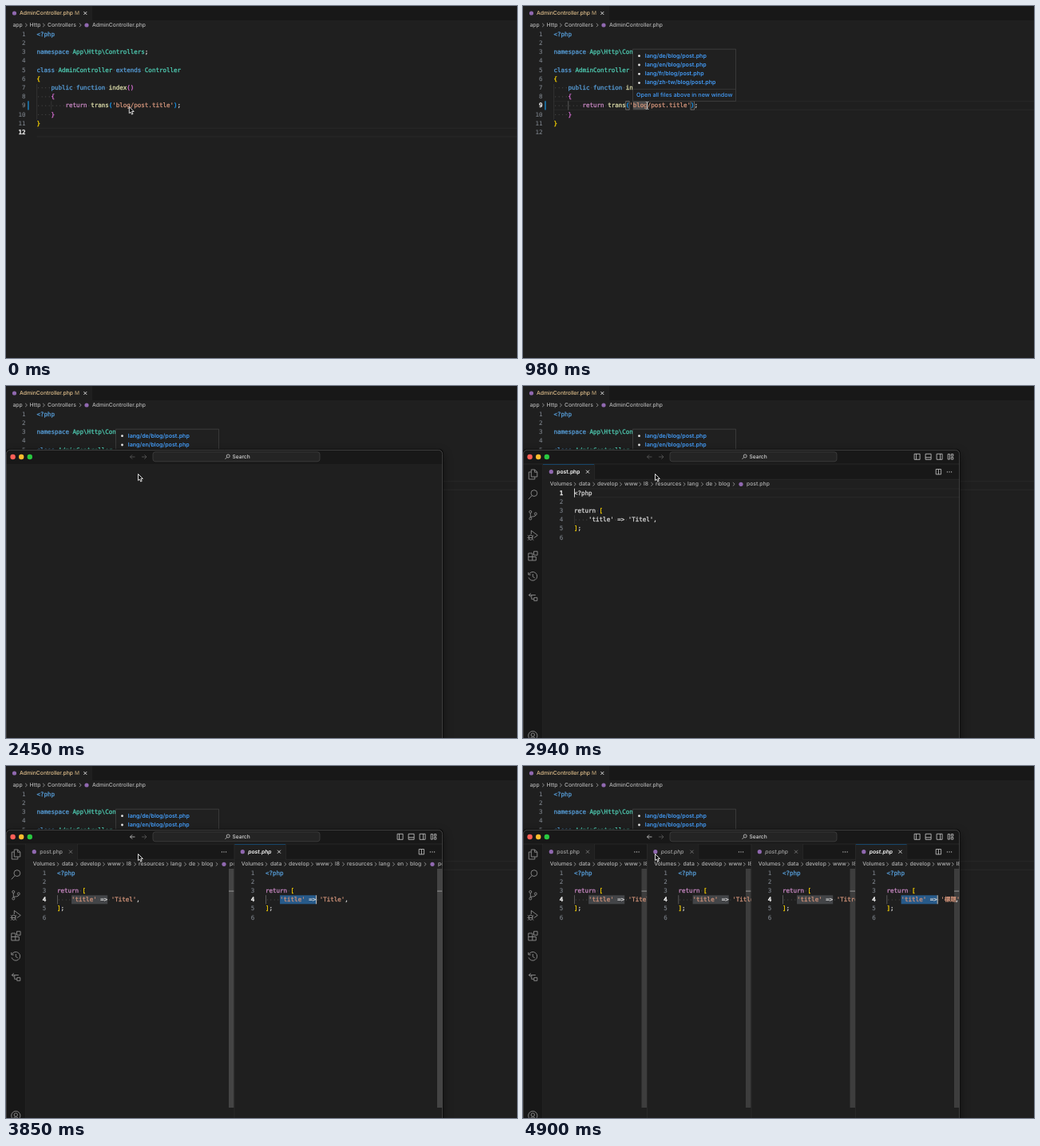
An HTML page with a canvas that plays this animation: 640x442 px, repeating every 4.97 s.

```html
<!DOCTYPE html>
<html lang="en">
<head>
<meta charset="utf-8">
<title>Open translation files</title>
<style>
html, body { margin: 0; width: 100%; height: 100%; overflow: hidden; background: #1f1f1f; }
canvas { display: block; width: 640px; height: 442px; }
</style>
</head>
<body>
<canvas id="stage"></canvas>
<script>
const W = 640, H = 442, LOOP = 4970, STEP = 70;
const CHAR = 4.515, LINE = 11.2;
const MONO = '7.5px "DejaVu Sans Mono", "Noto Sans CJK SC", "Noto Sans CJK JP", monospace';
const BG = '#1f1f1f', BAR = '#181818', EDGE = '#2b2b2b';
const COLORS = {
  b: '#569cd6', t: '#4ec9b0', g: '#ffd700', p: '#da70d6', k: '#c586c0',
  f: '#dcdcaa', s: '#ce9178', n: '#179fff', w: '#d4d4d4'
};
const T = {
  beam: 210, click: 350, popup: 770, move: 1260, moveEnd: 1540, window: 1750,
  search: 2240, bench: 2590, editor: 2730, tokens: 3010
};
const CLASS_CODE = [
  '~b<?php', '', '~bnamespace ~tApp\\Http\\Controllers~w;', '',
  '~bclass ~tAdminController ~bextends ~tController', '~g{',
  '~w    ~bpublic function ~findex~p()', '~w    ~p{',
  "~w        ~kreturn ~ftrans~n(~s'blog/post.title'~n)~w;",
  '~w    ~p}', '~g}', ''
];
const PANES = [
  { lang: 'de', word: 'Titel', open: T.editor, select: 3150 },
  { lang: 'en', word: 'Title', open: 3430, select: 3640 },
  { lang: 'fr', word: 'Titre', open: 3920, select: 4060 },
  { lang: 'zh-tw', word: '標題', open: 4200, select: 4410 }
];

const canvas = document.getElementById('stage');
const c = canvas.getContext('2d');
const ratio = window.devicePixelRatio || 1;
canvas.width = W * ratio;
canvas.height = H * ratio;

function rect(x, y, w, h, color) {
  c.fillStyle = color;
  c.fillRect(x, y, w, h);
}

function dot(x, y, r, color) {
  c.fillStyle = color;
  c.beginPath();
  c.arc(x, y, r, 0, 7);
  c.fill();
}

function stroke(d, color, width = 0.8, x = 0, y = 0) {
  c.save();
  c.translate(x, y);
  c.strokeStyle = color;
  c.lineWidth = width;
  c.stroke(new Path2D(d));
  c.restore();
}

function label(text, x, y, color, size = 6.8, style = '500') {
  c.font = `${style} ${size}px Inter, "Open Sans", sans-serif`;
  c.fillStyle = color;
  c.fillText(text, x, y);
}

// A hairline outline gives the code its semi-bold look.
function mono(text, x, y, color, weight = 0.3) {
  c.font = MONO;
  c.fillStyle = c.strokeStyle = color;
  c.lineWidth = weight;
  c.fillText(text, x, y + 0.5);
  c.strokeText(text, x, y + 0.5);
}

function clip(x, y, w, h, draw) {
  c.save();
  c.beginPath();
  c.rect(x, y, w, h);
  c.clip();
  draw();
  c.restore();
}

const icon = (x, y) => dot(x, y, 2.6, '#9068b0');
const chevron = (x, y) => stroke('M-1.2 -2.2 L1.2 0 L-1.2 2.2', '#a0a0a0', 0.8, x, y);
const cross = (x, y, color) => stroke('M-2 -2 L2 2 M2 -2 L-2 2', color, 0.9, x, y);

function codeLine(line, x, y, plain) {
  for (const token of line.split('~').slice(1)) {
    const text = token.slice(1);
    mono(text, x, y, plain && token[0] !== 'g' ? COLORS.w : COLORS[token[0]]);
    for (let i = 0; i < text.length; i++) {
      if (text[i] === ' ') rect(x + (i + 0.4) * CHAR, y - 0.2, 0.9, 0.9, '#565656');
    }
    x += text.length * CHAR;
  }
}

function codeBlock(lines, x, y, current, plain) {
  lines.forEach((line, i) => {
    const mid = y + i * LINE, active = i + 1 === current;
    c.textAlign = 'right';
    mono(i + 1, x - 13.8, mid, active ? '#e8e8e8' : '#7c828a', active ? 0.5 : 0.1);
    c.textAlign = 'left';
    codeLine(line, x, mid, plain);
  });
}

function lineFrame(x, y, w) {
  rect(x, y - 5.6, w, 0.9, '#292929');
  rect(x, y + 5, w, 0.9, '#292929');
}

function crumbs(names, xs, ends, y, iconX, file) {
  names.forEach((name, i) => {
    label(name, xs[i], y, '#b4b4b4');
    chevron(ends[i], y);
  });
  icon(iconX, y);
  label(file, iconX + 7, y, '#b4b4b4');
}

function mainEditor(t) {
  const clicked = t >= T.click, current = clicked ? 9 : 12;
  const x = 38.4, y = 35.3, rowY = y + 8 * LINE;
  rect(0, 0, W, H, BG);
  rect(0, 0, W, 18, BAR);
  rect(0, 0, 108, 18, BG);
  icon(10.5, 9);
  label('AdminController.php', 17, 9, '#e2c08d');
  label('M', 86, 9, '#b59b72', 6.6);
  cross(99.3, 9, '#e0e0e0');
  crumbs(['app', 'Http', 'Controllers'], [8.5, 29.5, 52], [25.3, 47.3, 93], 24, 101, 'AdminController.php');

  lineFrame(x, y + (current - 1) * LINE, W - x);
  rect(x, y + 5.6 * LINE, 0.7, 4 * LINE, '#3a3a3a');
  rect(x + 4 * CHAR, rowY - LINE / 2, 0.7, LINE, clicked ? '#707070' : '#3a3a3a');
  rect(27.2, rowY - LINE / 2, 1.5, LINE, '#1b7fbd');
  if (t >= T.popup) rect(x + 22 * CHAR, rowY - 5.4, 4 * CHAR, 10.8, '#4b4b4b');
  if (clicked) {
    c.strokeStyle = '#858585';
    c.lineWidth = 0.7;
    for (const col of [20, 38]) c.strokeRect(x + col * CHAR, rowY - 5.3, CHAR, 10.6);
  }
  codeBlock(CLASS_CODE, x, y, current);
}

function popup() {
  rect(137.3, 53.8, 129.4, 66, '#454545');
  rect(138, 54.5, 128, 64.6, '#202020');
  ['de', 'en', 'fr', 'zh-tw'].forEach((lang, i) => {
    const y = 62.4 + i * 11.3;
    dot(145.5, y + 0.3, 1.4, '#e8e8e8');
    label(`lang/${lang}/blog/post.php`, 152.8, y, '#439dfa', 7.1, '600');
  });
  rect(138, 104, 128, 0.7, '#3c3c3c');
  label('Open all files above in new window', 142, 111.8, '#439dfa', 7.2);
}

function titleBar(t) {
  const back = t >= PANES[1].open ? '#cccccc' : '#5c5c5c';
  stroke('M3 0 H-3 M-0.4 -2.6 L-3 0 L-0.4 2.6', back, 0.8, 158.5, 89);
  stroke('M-3 0 H3 M0.4 -2.6 L3 0 L0.4 2.6', '#5c5c5c', 0.8, 173, 89);
  c.beginPath();
  c.roundRect(184, 82.8, 209, 12, 3);
  c.fillStyle = '#242424';
  c.fill();
  c.strokeStyle = '#414141';
  c.lineWidth = 0.8;
  c.stroke();
  stroke('M2.7 -1 a2 2 0 1 1 -4 0 a2 2 0 1 1 4 0 M-0.8 0.5 L-3 2.8', '#cccccc', 0.8, 277.5, 89);
  label('Search', 283.5, 88.6, '#d8d8d8', 6.6);
}

function workbench() {
  rect(0, 98, 24.5, H, BAR);
  rect(24.5, 98, 0.8, H, EDGE);
  rect(25, 98, 522, 19, BAR);
  rect(0, 97.6, 547, 0.8, EDGE);
  const box = 'M-3.5 -3.5 H3.5 V3.5 H-3.5 Z ';
  ['M-1 -3.5 V3.5', 'M-3.5 1 H3.5', 'M1 -3.5 V3.5'].forEach((d, i) =>
    stroke(box + d, '#cccccc', 0.8, 493.6 + 14 * i, 88.8));
  stroke('M-3.3 -3.3 h2.2 v6.6 h-2.2 Z M0.8 -3.3 h2.5 v2.5 h-2.5 Z M0.8 0.8 h2.5 v2.5 h-2.5 Z',
    '#cccccc', 0.8, 535.5, 88.8);

  const ring = 'a1.5 1.5 0 1 1 3 0 a1.5 1.5 0 1 1 -3 0 ';
  const icons = [
    [111, 'M-2 -6 H2.5 L5.5 -3 V3 H-2 Z M2.3 -6 V-2.8 H5.5 M-2 -3 H-5 V6 H2.5 V3'],
    [136.3, 'M5.5 -1.7 a3.9 3.9 0 1 1 -7.8 0 a3.9 3.9 0 1 1 7.8 0 M-1.2 1.3 L-5.5 6'],
    [162, `M-4.5 -4 ${ring} M-4.5 4.5 ${ring} M2 -1.5 ${ring} M-3 -2.5 V3 M3.5 0 Q3.5 2 0 2 Q-3 2 -3 3`],
    [187.5, 'M-2 -1.5 V-6 L6 0 L1.5 3.2 M-5 2 a2.3 2.3 0 0 1 4.6 0 v1.5 a2.3 2.3 0 0 1 -4.6 0 Z M-6.5 0 l1.7 1.5 M1 0 l-1.6 1.5 M-6.8 3 h6.6 M-6.2 6.2 l1.5 -1.5 M1 6.2 l-1.6 -1.5'],
    [213.5, 'M-5.5 -3.5 H-0.5 V5.5 H-5.5 Z M-5.5 1 H4 V5.5 H-0.5 M1.2 -5.8 H5.8 V-1.2 H1.2 Z'],
    [239, 'M-5 -2.3 A5.4 5.4 0 1 1 -5.2 1.5 M-5.5 -5 V-2 H-2.5 M0 -3 V0.5 L2.5 2'],
    [264.5, 'M-5 -2 H3.5 M-2.5 -4.5 L-5 -2 L-2.5 0.5 M-1.5 -2 V3.2 H1.5 M1.5 1.2 h4 v4 h-4 Z'],
    [439, 'M5.6 0 a5.6 5.6 0 1 1 -11.2 0 a5.6 5.6 0 1 1 11.2 0 M2.2 -1 a2.2 2.2 0 1 1 -4.4 0 a2.2 2.2 0 1 1 4.4 0 M-3.8 4 Q0 -0.5 3.8 4']
  ];
  for (const [y, d] of icons) stroke(d, '#8a8a8a', 0.95, 12.3, y);
}

function pane({ lang, word, select }, t, x, w, active, first, split) {
  const selected = t >= select, right = x + w, code = x + 39, y = 134.2, row = y + 3 * LINE;
  rect(x, 98, 64, 19.5, BG);
  rect(x + 64, 98, 0.7, 19, EDGE);
  rect(x + 64, 116.8, w - 64, 0.7, EDGE);
  if (active) rect(x, 98, 64, 0.7, '#15588c');
  icon(x + 10.3, 107.7);
  label('post.php', x + 17.2, 107.7, active ? '#ffffff' : '#a4a4a4', 6.8,
    (first ? '' : 'italic ') + (active ? '600' : '500'));
  cross(x + 56, 107.7, active ? '#e0e0e0' : '#777777');
  for (const i of [-1, 0, 1]) dot(right - 13 + i * 2.6, 107.9, 0.65, '#cccccc');
  if (active) stroke('M-3.2 -3.2 H3.2 V3.2 H-3.2 Z M0 -3.2 V3.2', '#cccccc', 0.8, right - 26.6, 107.7);

  const wide = lang === 'zh-tw' ? 11 : 0;
  crumbs(['Volumes', 'data', 'develop', 'www', 'l8', 'resources', 'lang', lang, 'blog'],
    [8.7, 45, 68, 102, 126, 141, 181, 204, 220 + wide].map(v => v + x),
    [40, 63.7, 97.5, 121.7, 136.6, 177, 199.5, 216, 239 + wide].map(v => v + x),
    123.3, x + 248 + wide, 'post.php');

  if (active && !selected) lineFrame(code, y, w - 39);
  rect(code, row - LINE / 2, 0.7, LINE, selected ? '#707070' : '#3a3a3a');
  if (selected) {
    rect(code + 4 * CHAR, row - 5.5, 10 * CHAR, 11, active ? '#275a8a' : '#434548');
  }
  if (split && selected) {
    rect(right - 7, 129, 6.5, 300, t < 4600 ? '#444444' : '#3d3d3d');
    rect(right - 7, 156.6, 6.5, 1, '#959595');
  }
  const lines = ['~b<?php', '', '~kreturn ~g[', `~w    ~s'title'~w => ~s'${word}'~w,`, '~g]~w;', ''];
  codeBlock(lines, code, y, selected ? 4 : 1, t < T.tokens);
  if (active) {
    rect(selected ? code + 14 * CHAR : code, (selected ? row : y) - 5.5, 0.9, 11, '#e0e0e0');
  }
}

function windowPath(grow) {
  c.beginPath();
  c.roundRect(-grow, 80 - grow, 547 + 2 * grow, 400, 5);
}

function editorWindow(t) {
  c.save();
  c.shadowColor = 'rgba(0,0,0,.45)';
  c.shadowBlur = 12 * ratio;
  c.shadowOffsetY = 5 * ratio;
  windowPath(0.8);
  c.fillStyle = '#0a0a0a';
  c.fill();
  c.restore();
  c.save();
  windowPath(0);
  c.fillStyle = BG;
  c.fill();
  c.clip();
  if (t >= T.search) rect(0, 80, 547, 18, BAR);
  ['#ff5f57', '#febc2e', '#28c840'].forEach((color, i) => dot(8.6 + 10.6 * i, 89, 3.2, color));
  if (t >= T.search) titleBar(t);
  if (t >= T.bench) workbench();
  const open = PANES.filter(p => t >= p.open), w = 522 / open.length;
  open.forEach((p, i) => {
    const x = 25 + i * w;
    clip(x, 98, w, H, () => {
      rect(x, 117, w, H, BG);
      pane(p, t, x, w, i === open.length - 1, i === 0, open.length > 1);
    });
    if (i) rect(x - 0.4, 98, 0.8, H, EDGE);
  });
  c.restore();
  windowPath(-0.4);
  c.strokeStyle = '#4c4c4c';
  c.lineWidth = 0.8;
  c.stroke();
}

function pointer(t) {
  const p = Math.min(1, Math.max(0, (t - T.move) / (T.moveEnd - T.move)));
  const ease = p * p * (3 - 2 * p);
  const x = 155.5 + 10 * ease, y = 125 - 14.5 * ease;
  const overLink = t >= T.popup && y < 119.5;
  if (t >= T.beam && t < T.window && !overLink) {
    const beam = 'M-1.7 -4.5 Q0 -4.5 0 -3.5 Q0 -4.5 1.7 -4.5 M0 -3.5 V3.5 M-1.7 4.5 Q0 4.5 0 3.5 Q0 4.5 1.7 4.5';
    stroke(beam, '#222222', 1.9, x, y);
    stroke(beam, '#eeeeee', 0.9, x, y);
    return;
  }
  const hand = overLink && t < T.window;
  const shape = new Path2D(hand
    ? 'M-1 5 V0.7 Q0 -0.7 1 0.7 V3.5 L4.6 4.4 Q5.6 4.8 5.3 6 L4.4 9.5 H0 L-3 6 Q-3.2 4.6 -1 5.5 Z'
    : 'M0 0 V8.2 L1.9 6.5 L3.2 9.5 L4.7 8.9 L3.4 5.9 H5.9 Z');
  c.save();
  c.translate(t < T.beam ? 154.3 : x, t < T.beam ? 126.6 : y);
  c.lineJoin = 'round';
  c.fillStyle = '#111111';
  c.strokeStyle = '#f0f0f0';
  c.lineWidth = 0.9;
  c.fill(shape);
  c.stroke(shape);
  c.restore();
}

function draw(now) {
  const t = Math.floor((now % LOOP) / STEP) * STEP;
  c.setTransform(ratio, 0, 0, ratio, 0, 0);
  c.textBaseline = 'middle';
  c.textRendering = 'geometricPrecision';
  c.lineJoin = 'round';
  mainEditor(t);
  if (t >= T.popup) popup();
  if (t >= T.window) editorWindow(t);
  pointer(t);
}

const start = performance.now();
function tick() {
  draw(performance.now() - start);
  requestAnimationFrame(tick);
}
tick();
</script>
</body>
</html>
```
